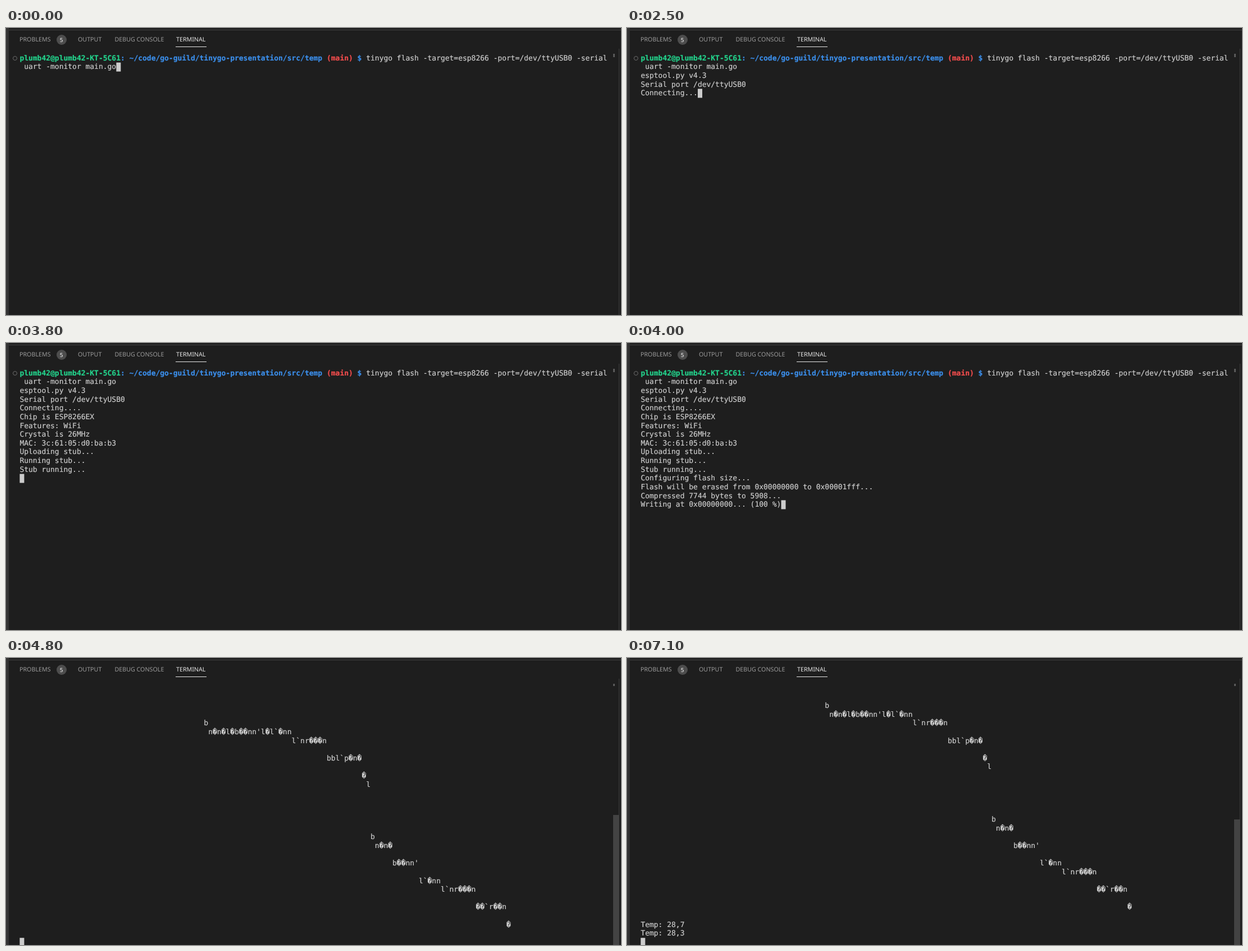
Write an HTML page that moves like this. It is 1095 by 512 pixels and loops after 8 s.

```html
<!DOCTYPE html>
<html lang="en">
<head>
<meta charset="utf-8">
<title>Flashing a board from the terminal</title>
<style>
  html, body { margin: 0; width: 100%; height: 100%; overflow: hidden; background: #1e1e1e; }
  body { position: relative; }
  body * { position: absolute; box-sizing: border-box; }
  .tab {
    top: 11px; line-height: 20px; white-space: pre; color: #9b9b9b;
    font-family: "Noto Sans", sans-serif; font-size: 10.7px; text-rendering: geometricPrecision;
  }
  .active { color: #e7e7e7; }
  #badge {
    left: 89.5px; top: 12px; width: 18px; height: 18px; border-radius: 50%;
    background: #4d4d4d; color: #fff; font-size: 10px; line-height: 18px; text-align: center;
  }
  #underline { left: 302px; top: 33px; width: 55px; height: 1px; background: #e7e7e7; }
  #topEdge { left: 0; top: 3px; width: 100%; height: 1px; background: #444; }
  #leftEdge { left: 0; top: 0; width: 5px; height: 100%; background: #333; }
  #rightEdge { left: 1091px; top: 37px; width: 1px; height: 475px; background: #3c3c3c; }
  pre {
    left: 24.4px; top: 46.8px; margin: 0; color: #ccc; white-space: pre;
    font: 12.98px/15.63px "DejaVu Sans Mono", monospace; text-rendering: geometricPrecision;
    font-variant-ligatures: none; -webkit-text-stroke: .2px;
  }
  #prompt { font-weight: bold; color: #3b8eea; }
  #prompt span { position: static; }
  #prompt .user { color: #23d18b; }
  #prompt .branch { color: #f14c4c; }
  #ring { left: 11.5px; top: 50px; width: 8px; height: 8px; border: 1.3px solid #6b6b6b; border-radius: 50%; }
  #cursor { left: 0; top: 0; width: 8px; height: 16px; background: #ccc; }
  #marker { left: 1081px; top: 46px; width: 3px; background: #5a5a5a; }
  #slider { left: 1081px; bottom: 0; width: 10px; background: #434343; }
</style>
</head>
<body>
<div id="topEdge"></div>
<div id="leftEdge"></div>
<div id="rightEdge"></div>
<div class="tab" style="left:24px">PROBLEMS</div>
<div class="tab" id="badge">5</div>
<div class="tab" style="left:128px">OUTPUT</div>
<div class="tab" style="left:193.5px">DEBUG CONSOLE</div>
<div class="tab active" style="left:303px">TERMINAL</div>
<div id="underline"></div>
<div id="shell">
  <div id="ring"></div>
  <pre id="prompt"><span class="user">plumb42@plumb42-KT-5C61</span>: ~/code/go-guild/tinygo-presentation/src/temp <span class="branch">(main)</span> $</pre>
</div>
<pre id="output"></pre>
<div id="cursor"></div>
<div id="marker"></div>
<div id="slider"></div>
<script>
const LOOP = 8000, CELL_W = 7.816, CELL_H = 15.63, LEFT = 24.4, TOP = 46, HEIGHT = 512;
const $ = id => document.getElementById(id);

const scenes = [];
let log = " ".repeat(79) + "tinygo flash -target=esp8266 -port=/dev/ttyUSB0 -serial\n uart -monitor main.go";
const print = (time, text) => scenes.push({ time, text: log += text });

print(0, "");
print(1000, "\n");
print(2500, "esptool.py v4.3\nSerial port /dev/ttyUSB0\nConnecting...");
print(2800, ".\nChip is ESP8266EX\n");
print(2900, "Features: WiFi\nCrystal is 26MHz\nMAC: 3c:61:05:d0:ba:b3\nUploading stub...\n");
print(3800, "Running stub...\nStub running...\n");
print(4000, "Configuring flash size...\nFlash will be erased from 0x00000000 to 0x00001fff...\n" +
  "Compressed 7744 bytes to 5908...\nWriting at 0x00000000... (100 %)");
log = log.slice(0, log.lastIndexOf("\n") + 1);
print(4600, "Wrote 7744 bytes (5908 compressed) at 0x00000000 in 0.6 seconds (effective 96.1 kbit/s)...\n");
print(4700, "Hash of data verified.\n\nLeaving...\nHard resetting via RTS pin...\n");

// Bare line feeds keep the column, so the boot noise runs down like a staircase.
function staircase(text, column) {
  return text.split("\n").map(part => {
    const line = " ".repeat(column) + part;
    column += part.length;
    return line;
  }).join("\n");
}
const noise = staircase("b\nn?n?l?b??nn'l?l`?nn\nl`nr???n\n\nbbl`p?n?\n\n?\nl\n\n\n\n\n\n" +
  "b\nn?n?\n\nb??nn'\n\nl`?nn\nl`nr???n\n\n??`r??n\n\n?", 42).replaceAll("?", "\ufffd");

const monitor = (time, blankRows, readings, sliderTop) => scenes.push({
  time, sliderTop,
  text: "\n".repeat(blankRows) + noise + "\n\n" + readings.map(r => `Temp: ${r}\n`).join("")
});
monitor(4800, 4, [], 280);
monitor(5100, 3, ["28,7"], 284);
monitor(7100, 2, ["28,7", "28,3"], 288);

let shown;
function show(scene) {
  const lines = scene.text.split("\n"), scrolled = "sliderTop" in scene;
  const x = LEFT + lines.at(-1).length * CELL_W, y = TOP + (lines.length - 1) * CELL_H;
  $("output").textContent = scene.text;
  $("cursor").style.transform = `translate(${x}px, ${y}px)`;
  $("shell").style.display = scrolled ? "none" : "block";
  $("marker").style.height = (scrolled ? 4 : 6) + "px";
  $("slider").style.height = (scrolled ? HEIGHT - scene.sliderTop : 0) + "px";
}

function frame() {
  const time = performance.now() % LOOP;
  const scene = scenes.findLast(s => s.time <= time);
  if (scene !== shown) show(shown = scene);
  requestAnimationFrame(frame);
}
frame();
</script>
</body>
</html>
```
